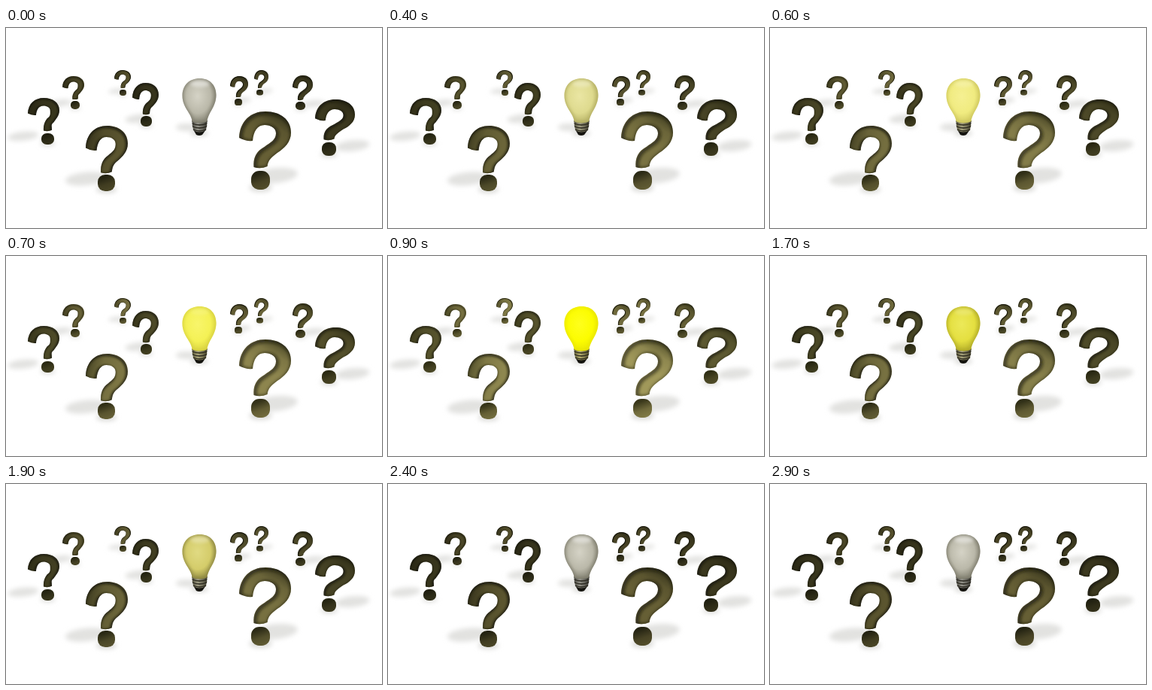
An HTML page for the animation above (3000 ms loop, 500x266 px).

```html
<!DOCTYPE html>
<html lang="en">
<head>
<meta charset="utf-8">
<title>Bright idea</title>
<style>
html, body { margin: 0; width: 100%; height: 100%; overflow: hidden; background: #fff; }
svg { display: block; width: 100vw; height: 100vh; }
</style>
</head>
<body>
<svg viewBox="0 0 500 266" xmlns="http://www.w3.org/2000/svg">
  <defs>
    <path id="glass" d="M247.500 124C246.500 113 234.500 106 234.500 90C234.500 76 244 67 257.500 67C271 67 279.500 76 279.500 89C279.500 105 269 112 267.500 124C262 127 253 127 247.500 124Z"/>
    <clipPath id="glassClip"><use href="#glass"/></clipPath>
    <filter id="soft" x="-50%" y="-80%" width="200%" height="260%"><feGaussianBlur stdDeviation="3"/></filter>
    <filter id="edge" x="-20%" y="-40%" width="140%" height="180%"><feGaussianBlur stdDeviation="2"/></filter>
    <radialGradient id="glow" cx=".45" cy=".4" r=".64">
      <stop offset="0"/><stop offset=".6"/><stop offset="1"/>
    </radialGradient>
    <linearGradient id="metal">
      <stop offset="0"/><stop offset=".4"/><stop offset="1"/>
    </linearGradient>
  </defs>
  <g id="shadows" filter="url(#soft)"></g>
  <g id="marks"></g>
  <g id="bulb">
    <path d="M249 135L266 135L261 142Q257 144 253 142Z" fill="#15140f"/>
    <path d="M247 123H268L267 128Q268 130 266.500 132L266 136Q257 141 249 136L248.500 132Q247 130 248 128Z" fill="url(#metal)"/>
    <path d="M247.500 127Q257 131 267.500 127M248 131Q257 135 267 131M249 135Q257 139 266 135" fill="none" stroke="#25231a" stroke-width="1.3"/>
    <use href="#glass" fill="url(#glow)"/>
    <g clip-path="url(#glassClip)">
      <use id="rim" href="#glass" fill="none" stroke-width="3" filter="url(#edge)"/>
      <ellipse id="shine" cx="258" cy="74" rx="13" ry="4.500" fill="#fff" filter="url(#edge)"/>
    </g>
  </g>
</svg>
<script>
const NS = "http://www.w3.org/2000/svg";
const $ = id => document.getElementById(id);
const defs = document.querySelector("defs");

function add(parent, tag, attrs) {
  const el = document.createElementNS(NS, tag);
  for (const k in attrs) el.setAttribute(k, attrs[k]);
  parent.appendChild(el);
  return el;
}

// x, y, width, height of the hook; left, top, width, height of the dot; brightness
const MARKS = [
  [144, 56, 22, 24, 151, 82, 9, 8, .75],
  [330, 56, 19, 24, 333, 82, 9, 7.500, .65],
  [75, 64, 29, 31, 86, 97, 12, 11, .65],
  [298, 64, 24, 28, 304, 94, 10, 9, .6],
  [381, 63, 27, 33, 385, 98, 13, 11, .5],
  [168, 73, 35, 42, 179, 117, 15, 14, .4],
  [29, 93, 42, 44, 47, 140, 17, 15, .4],
  [411, 95, 53, 54, 420, 152, 19, 18, .45],
  [106, 130, 56, 63, 122, 195, 23, 22, .85],
  [310, 111, 69, 75, 326, 190, 25, 25, 1]
];

// time, light on the marks, then bulb centre, body and rim colours
const KEYS = [
  [0, 0, 0xd5d3c6, 0xbab8a9, 0x7c7a6b],
  [600, .5, 0xf5f092, 0xf0eb80, 0xcdc65c],
  [900, 1, 0xffff1c, 0xfcfc00, 0xe8e404],
  [1400, .95, 0xffff1c, 0xfcfc00, 0xe8e404],
  [1900, .3, 0xe0da82, 0xd4cc6a, 0x8a8440],
  [2400, 0, 0xd5d3c6, 0xbab8a9, 0x7c7a6b],
  [3000, 0, 0xd5d3c6, 0xbab8a9, 0x7c7a6b]
];

function mix(a, b, k) {
  return [16, 8, 0].reduce((sum, s) =>
    sum | Math.round((a >> s & 255) * (1 - k) + (b >> s & 255) * k) << s, 0);
}

const css = n => "#" + n.toString(16).padStart(6, "0");

// Hook in a 69 by 75 box; s is the middle of the stem, which stands over the dot
function hook(s) {
  const lean = s - 29;
  const out = 51 + lean * .4, inn = 34 + lean * .55;
  return `M0 35C1 13 15 0 35 0C55 0 69 11 69 28C69 41 60 49 ${out} 55
    C${out - 8} 61 ${s + 10} 65 ${s + 9} 73Q${s} 77 ${s - 9} 74
    C${s - 10} 62 ${s - 6} 53 ${inn} 47C${inn + 8} 41 49 38 49 29
    C49 22 42 18 34 18C24 18 19 27 18 39Q9 40 0 35Z`;
}

function gradient(tag, id, attrs, offsets) {
  const g = add(defs, tag, { id, ...attrs });
  return offsets.map(offset => add(g, "stop", { offset }));
}

const shaded = MARKS.map(([x, y, w, h, dx, dy, dw, dh, bright], i) => {
  const left = x < 250;
  const cx = dx + dw / 2, bottom = dy + dh;
  const sx = cx + (cx - 257) / 105 * dw, sy = bottom - dh * .75;
  add($("shadows"), "ellipse", {
    cx: sx, cy: sy, rx: dw * 1.2, ry: dh * .4, fill: "#e2e2e0", transform: `rotate(-6 ${sx} ${sy})`
  });
  add($("shadows"), "ellipse", { cx, cy: bottom - dh * .1, rx: dw * .6, ry: dh * .22, fill: "#dcdcd9" });

  const face = gradient("linearGradient", "face" + i,
    left ? { x1: 0, y1: .25, x2: .8, y2: .5 } : { x1: .7, y1: 0, x2: .45, y2: .5 },
    [0, .45, 1]);
  const ball = gradient("linearGradient", "ball" + i,
    { x1: .3, y1: 0, x2: .65, y2: 1 }, [.15, .6, 1]);

  const d = hook((cx - x) / w * 69);
  add(add(defs, "clipPath", { id: "clip" + i }), "path", { d });
  const g = add($("marks"), "g", { transform: `translate(${x} ${y}) scale(${w / 69} ${h / 75})` });
  add(g, "path", { d, fill: `url(#face${i})` });
  const inner = add(g, "g", { "clip-path": `url(#clip${i})` });
  const rim = add(inner, "path", {
    d, fill: "none", stroke: "#12120a", "stroke-width": 4, filter: "url(#edge)",
    transform: `translate(${left ? -1.5 : 1.5} 1.5)`
  });
  add($("marks"), "rect", {
    x: dx, y: dy, width: dw, height: dh, rx: dw * .43, ry: dh * .43, fill: `url(#ball${i})`
  });
  return { face, ball, rim, bright };
});

add($("shadows"), "ellipse", { cx: 240, cy: 132, rx: 14, ry: 5, fill: "#e2e2e0" });
add($("shadows"), "ellipse", { cx: 257, cy: 140, rx: 12, ry: 4, fill: "#dcdcd9" });

const paint = (stops, colours) => stops.forEach((s, i) => s.setAttribute("stop-color", css(colours[i])));
const glow = [...$("glow").children], metal = [...$("metal").children];

function draw(ms) {
  const t = Math.floor(ms % 3000 / 100) * 100;
  const n = KEYS.findIndex(k => k[0] > t);
  const a = KEYS[n - 1], b = KEYS[n];
  const k = (t - a[0]) / (b[0] - a[0]);
  const light = a[1] + (b[1] - a[1]) * k;
  const [core, body, rim] = [2, 3, 4].map(i => mix(a[i], b[i], k));

  paint(glow, [core, body, rim]);
  $("rim").setAttribute("stroke", css(rim));
  $("shine").setAttribute("opacity", .45 * (1 - light));
  paint(metal, [mix(0x45443d, 0x5c5830, light), mix(0x94938a, 0xb5ae70, light), mix(0x33322c, 0x454122, light)]);

  const dark = mix(0x1a1a0d, 0x27260f, light);
  const lit = mix(0x665f35, 0xa0985a, light);
  for (const m of shaded) {
    const tone = v => mix(dark, lit, v * m.bright);
    paint(m.face, [tone(.4), tone(.85), tone(1)]);
    paint(m.ball, [tone(.15), tone(.6), tone(.75)]);
    m.rim.setAttribute("opacity", .85 - light * .1);
  }
}

const start = performance.now();
function tick() {
  draw(performance.now() - start);
  requestAnimationFrame(tick);
}
tick();
</script>
</body>
</html>
```
